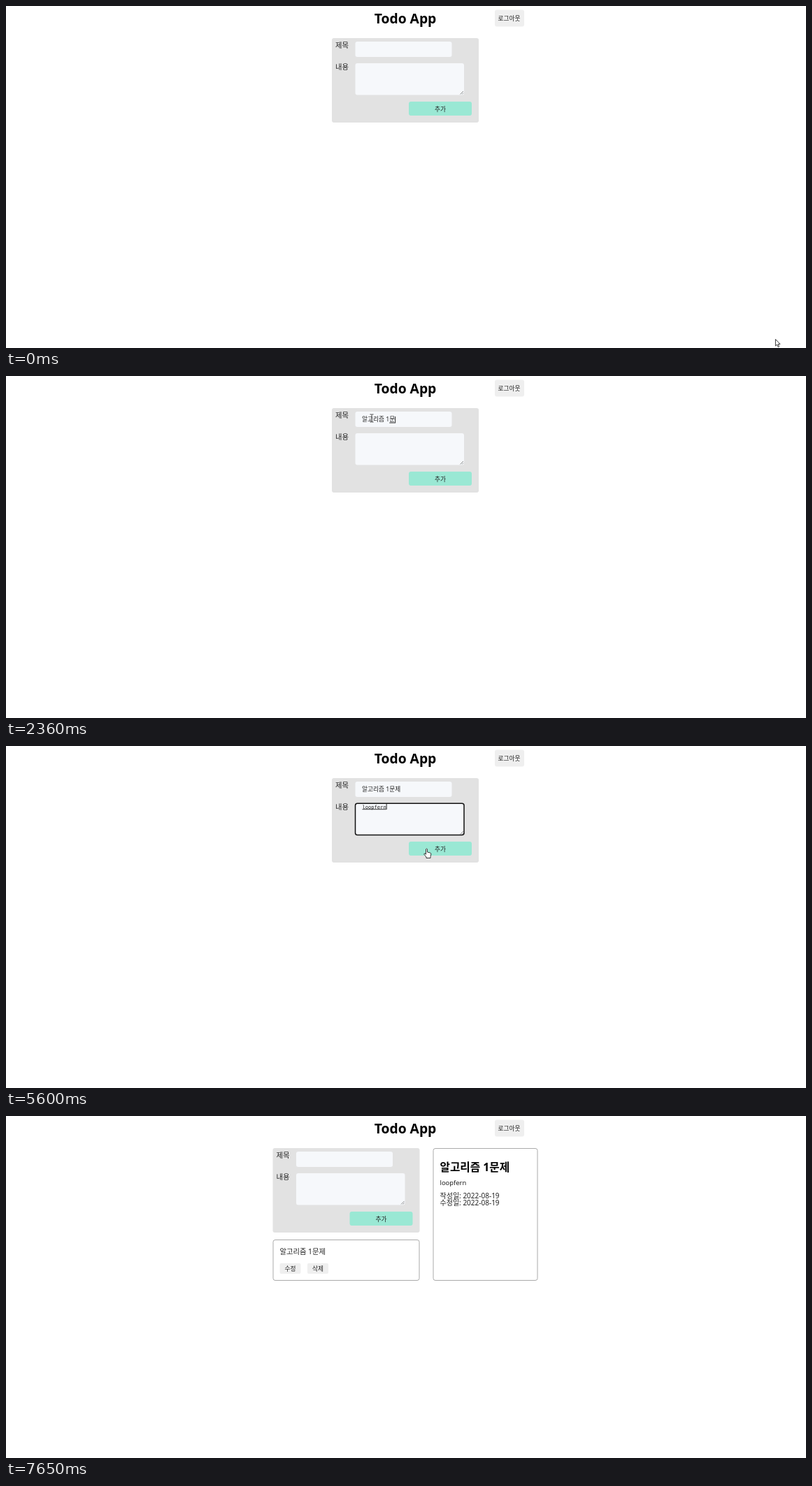
Animation, 1144 px wide and 490 px high, one loop 7740 ms. Source, as an HTML page:

```html
<!DOCTYPE html>
<html lang="ko">
<head>
<meta charset="utf-8">
<title>Todo App</title>
<style>
  html, body { margin: 0; width: 100%; height: 100%; overflow: hidden; background: #fff; }
  svg { display: block; width: 1144px; height: 490px; }
  text { font-family: "Noto Sans", "Noto Sans CJK KR", "Noto Sans CJK", sans-serif; font-size: 10.3px; fill: #222; white-space: pre; }
  .h1 { font-size: 19.3px; font-weight: 700; fill: #000; }
  .h2 { font-size: 15.7px; font-weight: 700; fill: #000; }
  .small { font-size: 8.7px; }
  .mid { text-anchor: middle; }
  .mono { font-family: "DejaVu Sans Mono", monospace; font-size: 7.1px; }
  .date { font-size: 10px; }
  .word { font-size: 9.4px; }
  .field { fill: #f6f8fb; }
  .gray { fill: #efefef; }
  .box { fill: #fff; stroke: #aaa; }
  .pointer { fill: #fff; stroke: #222; stroke-width: .9; stroke-linejoin: round; }
  .beam { fill: none; stroke: #444; }
</style>
</head>
<body>
<svg viewBox="0 0 1144 490">
  <text class="h1 mid" x="571" y="25">Todo App</text>
  <rect class="gray" x="699" y="5.5" width="42" height="24" rx="3"/>
  <text class="small mid" x="719.5" y="21">로그아웃</text>

  <g id="column">
    <rect x="466" y="46" width="210" height="121" rx="3" fill="#e2e2e2"/>
    <text x="471" y="59.6">제목</text>
    <text x="471" y="91">내용</text>
    <rect class="field" x="499.5" y="51" width="138" height="22" rx="3"/>
    <rect class="field" x="499.5" y="82" width="155.5" height="45.5" rx="3"/>
    <path d="M649.5 126.5l4.5-4.5M652 126.5l2-2" stroke="#777" stroke-width=".8"/>
    <rect id="focus" x="499.5" y="82.3" width="155.5" height="45.2" rx="3" fill="none" stroke="#111" stroke-width="1.5"/>
    <rect x="576" y="137" width="90" height="20" rx="3" fill="#9ae8d4"/>
    <text class="small mid" x="621" y="150.6">추가</text>
    <text id="subject" class="small" x="509" y="65.4"></text>
    <text id="body" class="mono" x="509.5" y="89.6"></text>
    <rect id="underline" height=".9" fill="#222"/>
    <rect id="caret" width=".9" fill="#111"/>
    <g id="card">
      <rect class="box" x="466.5" y="177.5" width="209" height="58" rx="3"/>
      <text x="476" y="197.6">알고리즘 1문제</text>
      <rect class="gray" x="476" y="211" width="30" height="15" rx="2"/>
      <rect class="gray" x="515.5" y="211" width="30" height="15" rx="2"/>
      <text class="small mid" x="491" y="222">수정</text>
      <text class="small mid" x="530.5" y="222">삭제</text>
    </g>
  </g>

  <g id="detail">
    <rect class="box" x="611" y="46.5" width="149" height="189" rx="3"/>
    <text class="h2" x="620.5" y="79">알고리즘 1문제</text>
    <text class="word" x="620.5" y="98.5">loopfern</text>
    <text class="date" x="620.5" y="117.8">작성일: 2022-08-19</text>
    <text class="date" x="620.5" y="127.6">수정일: 2022-08-19</text>
  </g>

  <g id="cursor">
    <path id="arrow" class="pointer" d="M.4 .5V10L2.6 8 4.1 11.5 5.6 10.8 4.2 7.4H7Z"/>
    <path id="beam" class="beam" d="M-2.5-5.5H-.7L0-5 .7-5.5H2.5M0-5V5M-2.5 5.5H-.7L0 5 .7 5.5H2.5"/>
    <path id="hand" class="pointer" d="M-1 .8Q0-.6 1 .8V5L5 6Q6.5 6.4 6.3 8L5.5 11.5V13.5H-.5V12L-3.6 8.2Q-3.8 6.6-2.4 7L-1 8.2Z"/>
  </g>
</svg>
<script>
const LOOP = 7740;
const TAB = 3010, PRESS = 5850, ADDED = 5920, OPENED = 7000;
const $ = id => document.getElementById(id);
const show = (id, on) => $(id).style.display = on ? '' : 'none';
const smooth = u => u * u * (3 - 2 * u);

// Each keystroke: time, field content, whether the last syllable is being composed
const subjectKeys = [
  [720, ''], [1150, 'ㅇ', 1], [1220, '아', 1], [1250, '알', 1],
  [1450, '알ㄱ', 1], [1520, '알고', 1], [1590, '알골', 1], [1670, '알고리', 1],
  [1740, '알고맂', 1], [1810, '알고리즈', 1], [1890, '알고리즘', 1],
  [1960, '알고리즘 '], [2040, '알고리즘 1'],
  [2260, '알고리즘 1ㅁ', 1], [2310, '알고리즘 1무', 1], [2360, '알고리즘 1문', 1],
  [2560, '알고리즘 1문ㅈ', 1], [2610, '알고리즘 1문제', 1]
];
const word = 'loopfern';
const bodyKeys = [[TAB, ''], ...[3660, 3750, 3830, 3920, 4090, 4190, 4290, 4390]
  .map((t, i) => [t, word.slice(0, i + 1)])];

// Pointer stops: time, x, y
const path = [
  [0, 1100, 477], [20, 1100, 477], [400, 538, 70], [600, 538, 70], [760, 523, 60.5],
  [4930, 523, 60.5], [5100, 529, 69], [5240, 529, 69], [5590, 601.5, 147],
  [6320, 601.5, 147], [6590, 537.5, 202.5], [6800, 528, 195],
  [7290, 528, 195], [7640, 955, 469]
];

const lastKey = (keys, t) => keys.findLast(k => k[0] <= t) || [0, ''];

function pointerAt(t) {
  const i = path.findIndex(p => p[0] > t);
  if (i < 0) return path.at(-1).slice(1);
  const [t0, x0, y0] = path[i - 1], [t1, x1, y1] = path[i];
  const u = smooth((t - t0) / (t1 - t0));
  return [x0 + (x1 - x0) * u, y0 + (y1 - y0) * u];
}

function pointerKind(x, y, t) {
  const px = x + (t >= OPENED ? 84.5 : 0);
  const inside = (l, r, top, bottom) => px > l && px < r && y > top && y < bottom;
  if (inside(499, 637, 51, 73) || inside(499, 655, 82, 128)) return 'beam';
  if (inside(576, 666, 137, 157)) return 'hand';
  if (t >= ADDED && inside(476, 666, 188, 200)) return 'hand';
  return 'arrow';
}

function drawBar(id, x, y, size, side) {
  const bar = $(id);
  bar.setAttribute('x', x);
  bar.setAttribute('y', y);
  bar.setAttribute(side, size);
}

function drawFields(t) {
  const inBody = t >= TAB;
  const subject = lastKey(subjectKeys, t), body = lastKey(bodyKeys, t);
  $('subject').textContent = t < ADDED ? subject[1] : '';
  $('body').textContent = t < ADDED ? body[1] : '';

  const [keyTime, value, composing] = inBody ? body : subject;
  const field = $(inBody ? 'body' : 'subject');
  const left = inBody ? 509.5 : 509;
  const width = value ? field.getComputedTextLength() : 0;
  const focused = t >= subjectKeys[0][0] && t < PRESS;
  show('caret', focused && (t - keyTime) % 1000 < 500);
  drawBar('caret', left + width, inBody ? 83 : 58, inBody ? 8 : 9.5, 'height');

  const marked = inBody ? t >= 4930 : composing;
  show('underline', marked && t < ADDED);
  if (marked && t < ADDED) {
    const start = inBody ? 0 : width - field.getSubStringLength(value.length - 1, 1);
    drawBar('underline', left + start, inBody ? 90.3 : 66.6, width - start, 'width');
  }
}

function draw(t) {
  drawFields(t);
  show('focus', t >= TAB && t < PRESS);
  show('card', t >= ADDED);
  show('detail', t >= OPENED);
  $('column').setAttribute('transform', `translate(${t >= OPENED ? -84.5 : 0} 0)`);

  const [x, y] = pointerAt(t), kind = pointerKind(x, y, t);
  show('cursor', t < 7650);
  $('cursor').setAttribute('transform', `translate(${x} ${y})`);
  for (const id of ['arrow', 'beam', 'hand']) show(id, id === kind);
}

const start = performance.now();
function tick() {
  draw((performance.now() - start) % LOOP);
  requestAnimationFrame(tick);
}
tick();
</script>
</body>
</html>
```
